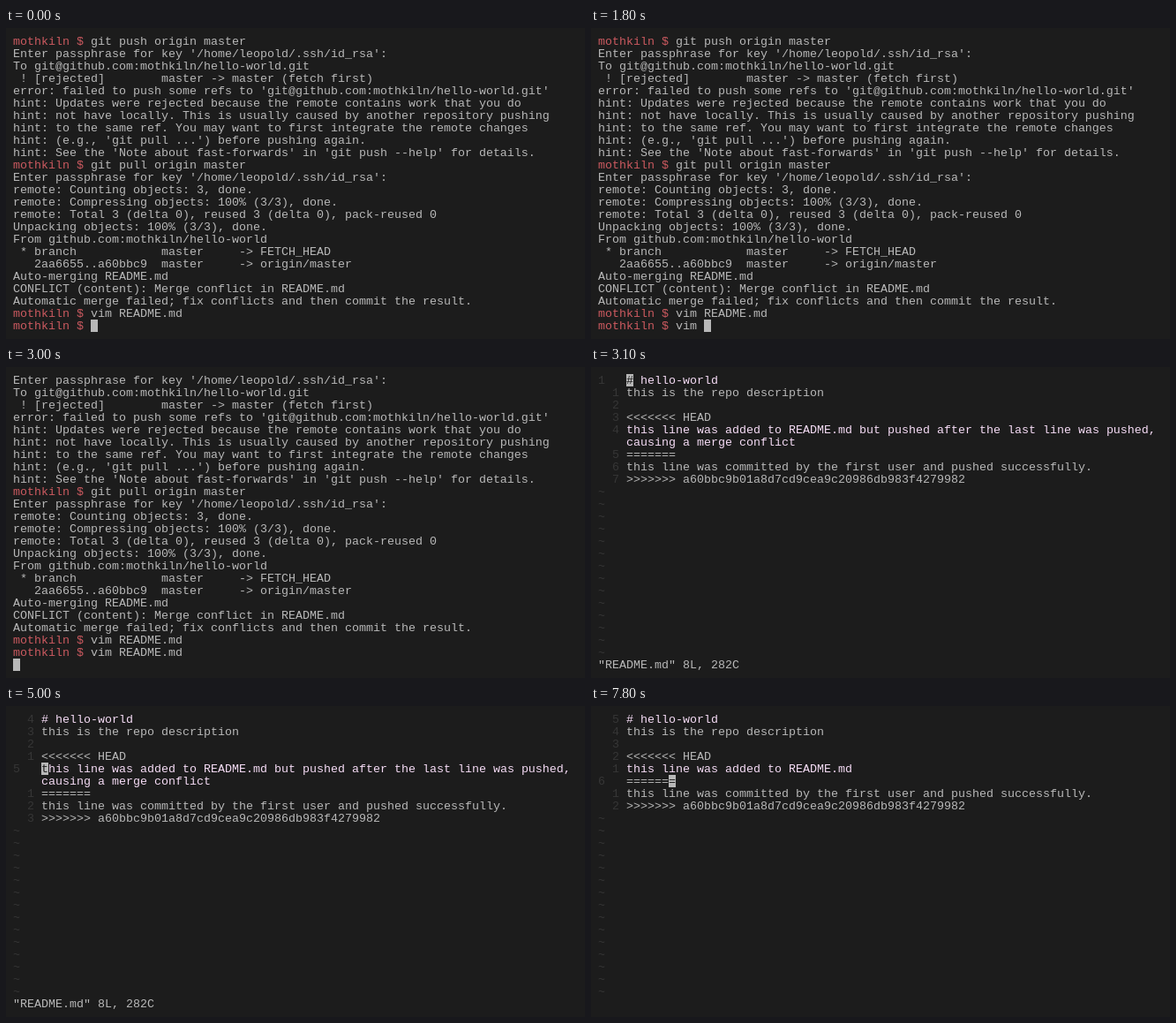
An HTML page with a canvas that plays this animation: 656 px wide and 352 px high, repeating every 8 s.

```html
<!DOCTYPE html>
<html lang="en">
<head>
<meta charset="utf-8">
<title>Resolving a merge conflict</title>
<style>
  html, body { margin: 0; width: 100%; height: 100%; overflow: hidden; background: #1c1c1c; }
  canvas { display: block; }
</style>
</head>
<body>
<canvas id="stage" width="656" height="352"></canvas>
<script>
const ctx = document.getElementById('stage').getContext('2d');
const LOOP = 8000, CELL_W = 8, CELL_H = 14, MARGIN = 8, LAST_ROW = 23;
const BG = '#1c1c1c', TEXT = '#b8b8b8', CURSOR = '#b8b8b8', PROMPT_RED = '#cc5a60',
      HEADING = '#f6dcf6', DIM = '#363636', MATCH = '#555';
const PROMPT = 'mothkiln $ ';

const shell = `${PROMPT}git push origin master
Enter passphrase for key '/home/leopold/.ssh/id_rsa':
To git@github.com:mothkiln/hello-world.git
 ! [rejected]        master -> master (fetch first)
error: failed to push some refs to 'git@github.com:mothkiln/hello-world.git'
hint: Updates were rejected because the remote contains work that you do
hint: not have locally. This is usually caused by another repository pushing
hint: to the same ref. You may want to first integrate the remote changes
hint: (e.g., 'git pull ...') before pushing again.
hint: See the 'Note about fast-forwards' in 'git push --help' for details.
${PROMPT}git pull origin master
Enter passphrase for key '/home/leopold/.ssh/id_rsa':
remote: Counting objects: 3, done.
remote: Compressing objects: 100% (3/3), done.
remote: Total 3 (delta 0), reused 3 (delta 0), pack-reused 0
Unpacking objects: 100% (3/3), done.
From github.com:mothkiln/hello-world
 * branch            master     -> FETCH_HEAD
   2aa6655..a60bbc9  master     -> origin/master
Auto-merging README.md
CONFLICT (content): Merge conflict in README.md
Automatic merge failed; fix conflicts and then commit the result.
${PROMPT}vim README.md`.split('\n');

const KEPT = 'this line was added to README.md ';
// Each buffer line is a list of its wrapped screen rows.
const fileLines = [
  ['# hello-world'],
  ['this is the repo description'],
  [''],
  ['<<<<<<< HEAD'],
  [KEPT + 'but pushed after the last line was pushed,', 'causing a merge conflict'],
  ['======='],
  ['this line was committed by the first user and pushed successfully.'],
  ['>>>>>>> a60bbc9b01a8d7cd9cea9c20986db983f4279982']
];
const HEADING_LINES = [0, 4];

// Timelines: [start in ms, state]
const typed = [
  [0, ''], [700, 'v'], [800, 'vi'], [900, 'vim'], [1000, 'vim '],
  [1100, 'vim r'], [1200, 'vim re'], [1300, 'vim rea'],
  [1600, 'vim re'], [1700, 'vim r'], [1800, 'vim '],
  [2000, 'vim R'], [2100, 'vim RE'], [2300, 'vim REA'], [2400, 'vim READ'],
  [2600, 'vim README.md ']
];
const cursorPath = [
  [0, [0, 0]], [4000, [1, 0]], [4400, [2, 0]], [4700, [3, 0]], [5000, [4, 0]],
  [6600, [4, KEPT.length]], [7100, [4, KEPT.length - 1]], [7600, [5, 6]]
];
const ENTER = 2900, VIM_OPEN = 3100, MATCH_ON = 4800, MATCH_OFF = 5000, DELETE = 7100;

const stateAt = (timeline, t) => timeline.findLast(([start]) => start <= t)[1];

function write(text, row, col, color = TEXT) {
  ctx.fillStyle = color;
  ctx.fillText(text, MARGIN + col * CELL_W, MARGIN + row * CELL_H + 11);
}

function block(row, col, char = '', fill = CURSOR, ink = BG) {
  ctx.fillStyle = fill;
  ctx.fillRect(MARGIN + col * CELL_W, MARGIN + row * CELL_H, CELL_W, CELL_H);
  write(char, row, col, ink);
}

function drawShell(t) {
  const command = stateAt(typed, t);
  const entered = t >= ENTER;
  const lines = [...shell, PROMPT + command];
  if (entered) lines.push('');
  lines.slice(-LAST_ROW - 1).forEach((line, row) => {
    const isPrompt = line.startsWith(PROMPT);
    if (isPrompt) write(PROMPT, row, 0, PROMPT_RED);
    const col = isPrompt ? PROMPT.length : 0;
    write(line.slice(col), row, col);
  });
  block(LAST_ROW, entered ? 0 : PROMPT.length + command.length);
}

function drawVim(t) {
  const gutter = 4;
  const deleted = t >= DELETE;
  const [cursorLine, cursorCol] = stateAt(cursorPath, t);
  let row = 0;
  fileLines.forEach((wrapped, i) => {
    const rows = deleted && i === 4 ? [KEPT] : wrapped;
    const current = i === cursorLine;
    const number = current ? `${i + 1}` : `${Math.abs(i - cursorLine)}`.padStart(3);
    write(number, row, 0, DIM);
    rows.forEach((text, k) =>
      write(text, row + k, gutter, HEADING_LINES.includes(i) ? HEADING : TEXT));
    if (current) block(row, gutter + cursorCol, rows[0][cursorCol]);
    if (i === 7 && t >= MATCH_ON && t < MATCH_OFF) block(row, gutter + 6, '>', MATCH, TEXT);
    row += rows.length;
  });
  for (; row < LAST_ROW; row++) write('~', row, 0, DIM);
  if (!deleted) write('"README.md" 8L, 282C', LAST_ROW, 0);
}

function frame(now) {
  const t = now % LOOP;
  ctx.fillStyle = BG;
  ctx.fillRect(0, 0, 656, 352);
  ctx.font = '13.333px "Liberation Mono", monospace';
  (t < VIM_OPEN ? drawShell : drawVim)(t);
  requestAnimationFrame(() => frame(performance.now() - started));
}

const started = performance.now();
frame(0);
</script>
</body>
</html>
```
